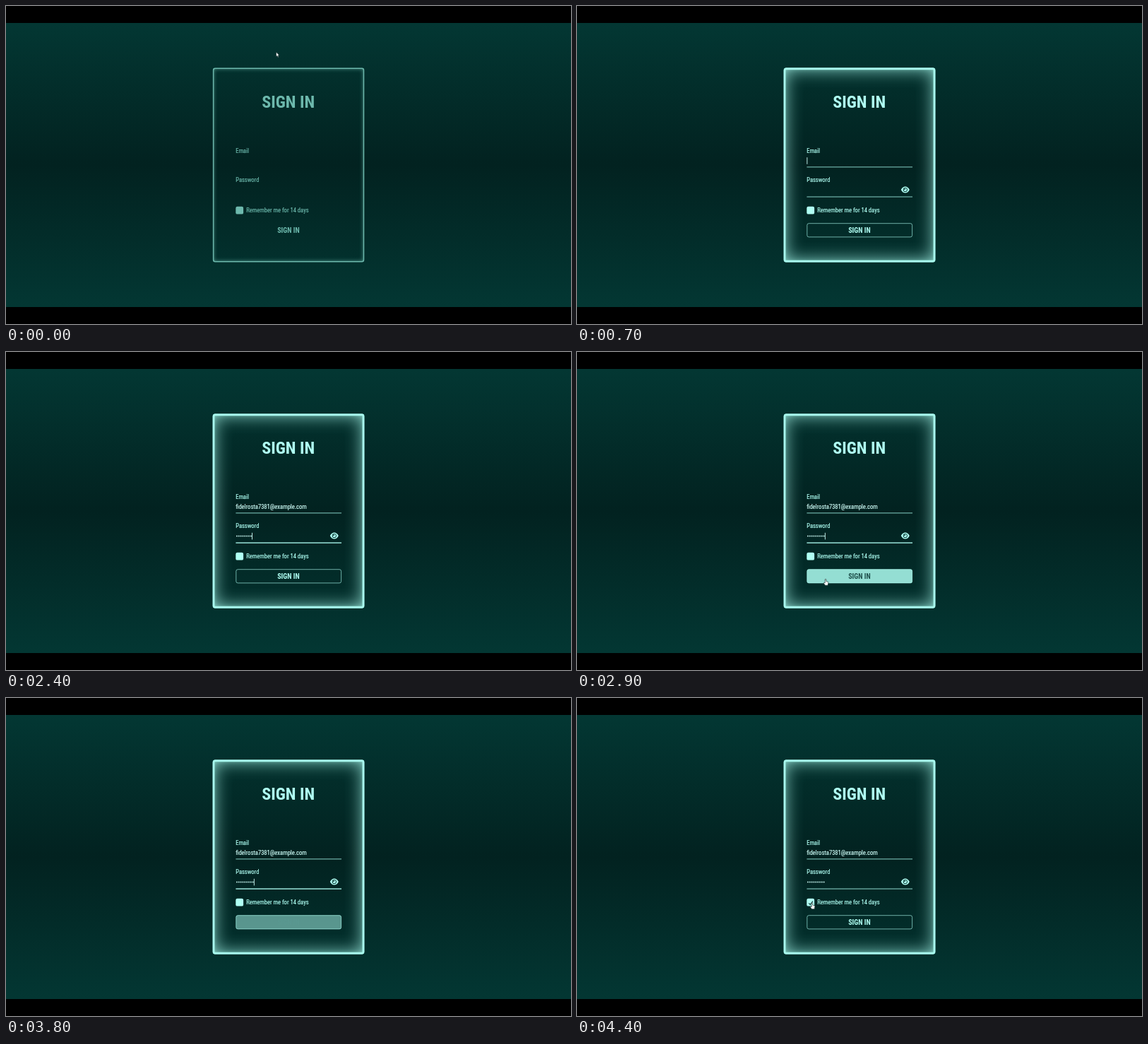
Write an HTML page that moves like this. It is 800 px wide and 450 px high and loops after 4.5 s.

```html
<!DOCTYPE html>
<html lang="en">
<head>
<meta charset="utf-8">
<title>Sign in</title>
<style>
  html, body { margin: 0; width: 100%; height: 100%; overflow: hidden; background: #000; }
  #stage { position: absolute; left: 0; top: 0; width: 800px; height: 450px; overflow: hidden; }
  #stage > * { position: absolute; }
  #page { left: 0; top: 24px; width: 800px; height: 402px;
    background: linear-gradient(#033733, #022220 50%, #033733); }
  .card { left: 293px; top: 88px; width: 214px; height: 274px; border-radius: 3px; }
  #rest { box-shadow: inset 0 0 6px rgba(120, 205, 190, .75); }
  #glow { box-shadow: inset 0 0 26px rgba(176, 255, 244, .88); }
  #form { left: 0; top: 0; }
  #frame { left: 292px; top: 87px; }
  text { font: 400 8.55px "Roboto Condensed", Roboto, sans-serif; font-stretch: 75%; fill: currentColor; }
  .small { stroke: currentColor; stroke-width: .16; }
  .bold { font-weight: 700; text-anchor: middle; }
  #title { font-size: 24px; }
  #send { font-size: 10.1px; }
  #entry { color: #d2fff9; fill: currentColor; }
  .line { fill: #b0fff4; }
  .mark { fill: #fff; stroke: #03211f; stroke-width: .6; stroke-linejoin: round; }
</style>
</head>
<body>
<div id="stage">
  <div id="page"></div>
  <div id="rest" class="card"></div>
  <div id="glow" class="card"></div>
  <svg id="form" width="800" height="450">
    <g id="ink">
      <rect x="293.6" y="88.2" width="212.9" height="273.6" rx="2.5" fill="none" stroke="currentColor" stroke-width="1.5"/>
      <text id="title" class="bold" x="399.8" y="143.8">SIGN IN</text>
      <text class="small" x="325.2" y="208">Email</text>
      <text class="small" x="325.2" y="249">Password</text>
      <rect x="325.3" y="283.8" width="10.8" height="10.8" rx="2.2" fill="currentColor"/>
      <text id="remember" class="small" x="340.3" y="292">Remember me for 14 days</text>
      <g id="extras">
        <rect id="mailLine" class="line" x="325.4" y="227.2" width="149.6" height="1.3"/>
        <rect id="passLine" class="line" x="325.4" y="269.4" width="149.6" height="1.3"/>
        <g transform="translate(464.8 260)">
          <path d="M-6 0C-3.3 -6 3.3 -6 6 0C3.3 6 -3.3 6 -6 0Z" fill="currentColor"/>
          <circle r="3.1" fill="#04302d"/>
          <circle r="2.2" fill="currentColor"/>
          <circle cx="-.8" cy="-.8" r=".9" fill="#04302d"/>
        </g>
        <rect id="fill" class="line" x="325.7" y="307.6" width="149" height="19.4" rx="2.5"/>
        <rect x="325.8" y="307.7" width="148.8" height="19.2" rx="2.5" fill="none" stroke="#b0fff4" stroke-opacity=".62"/>
      </g>
      <text id="send" class="bold" x="399.9" y="320.5">SIGN IN</text>
    </g>
    <g id="entry">
      <text id="mail" class="small" x="325.2" y="221.8">fidelrosta7381@example.com</text>
      <g id="dots"></g>
      <rect id="caret" width=".9" height="9.6"/>
    </g>
    <path id="tick" d="M328.2 290.3l2 2 3.6-4.6" fill="none" stroke="#04302d" stroke-width="1.1"/>
    <g id="pointer">
      <path id="arrow" class="mark" d="M0 0V6.7L1.5 5.4L2.6 7.8L3.7 7.3L2.6 5H4.6Z"/>
      <path id="hand" class="mark" d="M-.8 .7Q0 -.5 .8 .7V3.6L3.3 4.2Q4 4.5 3.9 5.4L3.2 9.2H-.6L-2.7 6.2Q-2.6 4.9 -1.6 5.4L-.8 6Z"/>
    </g>
  </svg>
  <svg id="frame" width="216" height="276">
    <rect x="2" y="1.9" width="212" height="272.2" rx="2" fill="none" stroke="#a9fbef" stroke-width="2.8"/>
  </svg>
</div>
<script>
  const LOOP = 4500, STEP = 100;
  const LEFT = 325.4, PITCH = 2.83, DOTS = 9;
  const DIM = [109, 185, 173], BRIGHT = [176, 255, 243], DEEP = [3, 48, 45];
  const MAIL_FOCUS = 700, MAIL_FILLED = 1000, PASS_FOCUS = 1300, LAST_KEY = 2550, CHECKED = 4300;

  const el = {};
  document.querySelectorAll('[id]').forEach(node => el[node.id] = node);

  // time, x and y of the pointer's stops
  const stops = [
    [0, 382.5, 65], [300, 379, 203], [400, 378, 218], [1200, 378, 218], [1300, 378, 262],
    [2700, 378, 262], [2900, 352, 321], [3200, 334, 292], [3500, 334, 292],
    [3700, 495, 134], [3900, 372, 313], [4000, 339, 290], [4200, 333, 289.5], [LOOP, 333, 289.5]
  ];

  const ramp = (t, from, to) => Math.min(1, Math.max(0, (t - from) / (to - from)));
  const ease = (t, from, to) => { const p = ramp(t, from, to); return p * p * (3 - 2 * p); };
  const lerp = (a, b, p) => a + (b - a) * p;
  const mix = (a, b, p) => a.map((v, i) => lerp(v, b[i], p));
  const rgb = c => `rgb(${c.map(Math.round)})`;
  const show = (node, level) => node.style.opacity = Number(level);
  const place = (node, x, y) => node.setAttribute('transform', `translate(${x} ${y})`);

  const hover = (t, enter, leave) => ease(t, enter, enter + 200) * (1 - ease(t, leave, leave + 250));

  function pointerAt(t) {
    const i = stops.findIndex(stop => stop[0] > t);
    const [t0, x0, y0] = stops[i - 1], [t1, x1, y1] = stops[i];
    const p = ease(t, t0, t1);
    return [lerp(x0, x1, p), lerp(y0, y1, p)];
  }

  function drawPointer(t) {
    const [x, y] = pointerAt(t);
    const inside = (right, top, bottom) => x > 325 && x < right && y > top && y < bottom;
    const field = inside(475, 211, 229) || inside(475, 252, 271);
    const link = inside(336.5, 284, 295) || inside(475, 307, 327);
    place(el.pointer, x, y);
    show(el.arrow, !field && !link);
    show(el.hand, link);
  }

  function drawEntry(t) {
    // a quick burst of seven keys, then two slower ones
    const count = Math.floor(7 * ramp(t, 1733, 2200)) + Math.floor(2 * ramp(t, 2300, 2500));
    [...el.dots.children].forEach((dot, i) => show(dot, i < count));
    show(el.mail, t >= MAIL_FILLED);

    const onMail = t < PASS_FOCUS;
    const mailEnd = t < MAIL_FILLED ? 0 : el.mail.getComputedTextLength() + .5;
    place(el.caret, LEFT + (onMail ? mailEnd : count * PITCH), onMail ? 214.2 : 255.8);
    const lit = t < LAST_KEY || Math.floor((t - LAST_KEY) / 500) % 2 === 0;
    show(el.caret, t >= MAIL_FOCUS && lit);

    show(el.mailLine, .6 + .4 * (ease(t, MAIL_FOCUS, 1000) - ease(t, PASS_FOCUS, 1700)));
    show(el.passLine, .6 + .4 * (ease(t, PASS_FOCUS, 1700) - ease(t, 4150, 4450)));
  }

  function draw(t) {
    const wake = 1 - (1 - ramp(t, 100, 400)) ** 2;
    const ink = mix(DIM, BRIGHT, wake);
    el.ink.style.color = rgb(ink);
    show(el.glow, wake);
    show(el.extras, wake);

    // the heavy outline spreads along the top, then runs down
    const side = 50 * (1 - ramp(t, 100, 250));
    const below = t > 100 ? 98.5 * (1 - ease(t, 250, 600)) : 100;
    el.frame.style.clipPath = `inset(0 ${side}% ${below}% ${side}%)`;

    const press = hover(t, 2750, 3050) + hover(t, 3700, 3850);
    show(el.fill, press);
    el.send.style.fill = rgb(mix(ink, DEEP, press));

    drawEntry(t);
    drawPointer(t);
    show(el.tick, t >= CHECKED);
  }

  for (let i = 0; i < DOTS; i++) {
    const dot = document.createElementNS('http://www.w3.org/2000/svg', 'circle');
    dot.setAttribute('cx', LEFT + 1.6 + i * PITCH);
    dot.setAttribute('cy', 260.5);
    dot.setAttribute('r', .92);
    el.dots.append(dot);
  }

  // tighter tracking where no condensed face is available
  if (el.remember.getComputedTextLength() > 95) el.form.style.letterSpacing = '-.058em';

  function tick() {
    const step = Math.floor((performance.now() + 20) / STEP);
    draw(step * STEP % LOOP);
    requestAnimationFrame(tick);
  }
  tick();
</script>
</body>
</html>
```
